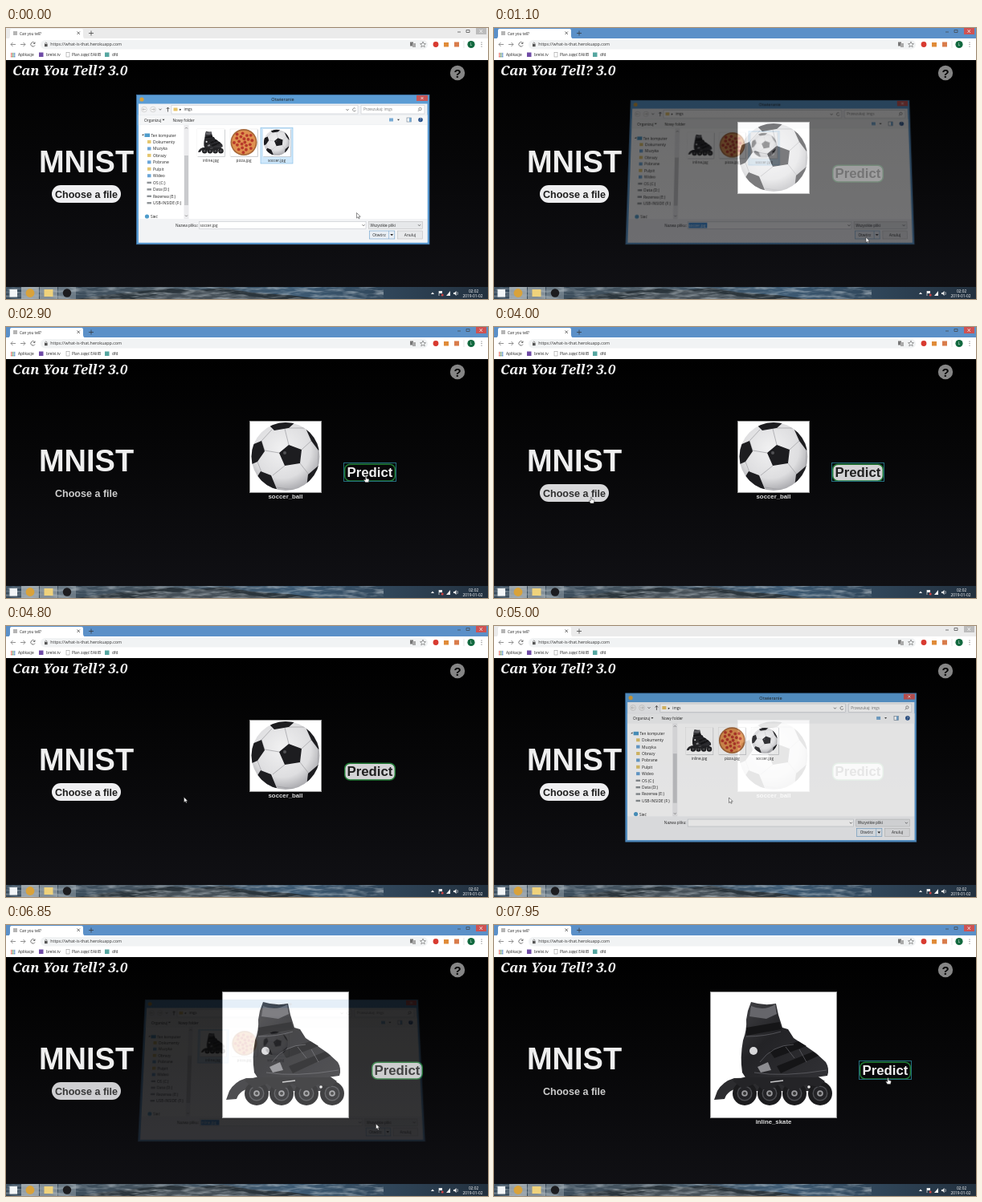
An HTML page for the animation above (8000 ms loop, 600 by 338 pixels).

```html
<!DOCTYPE html>
<html lang="pl">
<head>
<meta charset="utf-8">
<title>Can you tell?</title>
<style>
html, body { margin: 0; width: 100%; height: 100%; overflow: hidden; background: #000; }
svg { position: absolute; left: 0; top: 0; width: 600px; height: 338px; overflow: hidden; }
text { font-family: "Open Sans", "Noto Sans", sans-serif; white-space: pre; }
.bold { font-family: "Liberation Sans", Arial, sans-serif; font-weight: 700; text-anchor: middle; }
.brand { font-family: "Noto Serif", serif; font-weight: 700; font-style: italic; }
#dialog { position: absolute; left: 0; top: 0; width: 600px; height: 338px; }
</style>
</head>
<body>
<svg id="page" viewBox="0 0 600 338"></svg>
<div id="dialog"><svg id="dialogArt" viewBox="0 0 600 338"></svg></div>
<svg id="pointer" viewBox="0 0 600 338">
  <path id="arrow" d="M0 0V6.6L1.6 5.2 2.6 7.4 3.7 6.9 2.7 4.8H4.7Z" fill="#fff" stroke="#222" stroke-width=".5"/>
  <path id="hand" d="M-.7 0Q0-.8.7 0V2.6L3.3 3.2Q4 3.5 3.8 4.6L3.2 7.4H-.8L-2.8 4.5Q-2.4 3.4-.7 4.6Z" fill="#fff" stroke="#222" stroke-width=".5"/>
</svg>
<script>
const LOOP = 8000;
const FIRST_PICK = 1000, REOPEN = 4820, SECOND_PICK = 6620;
const $ = id => document.getElementById(id);
const text = (x, y, size, str, attrs = 'fill="#222"') =>
  `<text x="${x}" y="${y}" font-size="${size}" ${attrs}>${str}</text>`;
const box = (x, y, w, h, fill, attrs = '') =>
  `<rect x="${x}" y="${y}" width="${w}" height="${h}" fill="${fill}" ${attrs}/>`;
const dot = (x, y, r, fill, attrs = '') => `<circle cx="${x}" cy="${y}" r="${r}" fill="${fill}" ${attrs}/>`;
const shape = (d, fill, attrs = '') => `<path d="${d}" fill="${fill}" ${attrs}/>`;
const line = (d, color, width = .7) => shape(d, 'none', `stroke="${color}" stroke-width="${width}"`);

const wheel = x => dot(x, 210, 15, '#1c1c1e') + dot(x, 210, 9.5, '#4b4c50') +
  dot(x, 210, 8, '#232326') + dot(x, 210, 3.8, '#9a9a9d') + dot(x, 210, 2, '#333');

const defs = `<defs>
  <linearGradient id="night" x2="0" y2="1"><stop stop-color="#000"/><stop offset=".4" stop-color="#060607"/><stop offset="1" stop-color="#101014"/></linearGradient>
  <linearGradient id="sea"><stop stop-color="#34485a"/><stop offset=".3" stop-color="#46545f"/><stop offset=".6" stop-color="#3d5a73"/><stop offset="1" stop-color="#22303e"/></linearGradient>
  <filter id="ripples" x="0" y="0" width="1" height="1"><feTurbulence type="fractalNoise" baseFrequency=".05 .3" numOctaves="3" seed="4"/>
    <feColorMatrix values="0 0 0 0 .62 0 0 0 0 .68 0 0 0 0 .72 2.6 0 0 0 -1.1"/></filter>
  <radialGradient id="leather" cx=".45" cy=".4" r=".6"><stop stop-color="#f1f1f2"/><stop offset=".7" stop-color="#dedee0"/><stop offset="1" stop-color="#aeaeb2"/></radialGradient>
  <linearGradient id="boot" x2="1" y2="1"><stop stop-color="#424246"/><stop offset=".4" stop-color="#232326"/><stop offset="1" stop-color="#313135"/></linearGradient>
  <clipPath id="round"><circle cx="348" cy="161.5" r="42.5"/></clipPath>
  <symbol id="ball" viewBox="303 117 90 90">
    ${box(303, 117, 90, 90, '#fff')}${dot(348, 161.5, 42.5, 'url(#leather)')}
    <g clip-path="url(#round)">
      ${line('M340 157L322 154M352 147L347 127M368 153L381 141M366 170L377 184M347 173L332 185M322 154L318 142 331 128M352 126L374 126M389 153L388 174M375 198L358 203 337 200M318 181L313 168', '#9b9b9f')}
      ${shape('M340 157L352 147 368 153 366 170 347 173ZM328 123L343 117 360 119 352 126 334 129ZM318 142L322 155 313 168 304 172 304 148ZM372 124L380 128 392 147 389 154 380 142ZM317 180L330 185 337 202 326 203 312 188ZM376 184L390 172 388 187 374 200Z', '#1d1d20')}
    </g>${dot(347, 157, 2, '#75757a', 'opacity=".6"')}
  </symbol>
  <symbol id="skate" viewBox="269 83 158 158">
    ${box(269, 83, 158, 158, '#fff')}
    ${shape('M274 218L278 207Q285 195 299 191L390 189 408 194 404 207H322L307 203Q291 205 287 217Z', '#2c2c2f')}
    ${[312, 343, 374, 406].map(wheel).join('')}
    ${shape('M297 194L318 188H402L412 195 404 202 388 199 378 205H368L356 198 345 205H334L325 198 309 204Z', '#242427')}
    ${shape('M316 107L320 96Q336 101 351 98L354 112 359 128 366 130 373 141 388 151 401 160 413 171Q418 179 415 188L400 190H313L309 184Q306 165 310 144Q315 130 314 118Z', 'url(#boot)')}
    ${shape('M320 101Q336 108 350 99L352 111 339 117 318 114Z', '#66666b')}
    ${shape('M314 128L355 121 358 130 314 138ZM343 157L379 145 389 151 349 166ZM352 176L397 158 404 163 357 185Z', '#151517')}
    ${line('M314 139Q337 139 357 133M331 171Q346 150 373 149M324 184Q360 190 414 181M363 152L374 166M380 155L389 171', '#68686d')}
    ${shape('M328 177L341 171 345 181 332 184Z', '#8d8d91')}${dot(323, 157, 5, '#d8d8da')}
    ${dot(392, 202, 1.8, '#eee')}${line('M344 196L360 194', '#c8c8ca', 1.5)}
  </symbol>
</defs>`;

const browser = [
  box(0, 0, 600, 14, '#5b90c8', 'id="frameBar"'),
  shape('M3 13.5Q5 13 5 10V3Q5 1 7 1H94Q96 1 96 3V10Q96 13 98 13.5Z', '#fff'),
  box(0, 13, 600, 27, '#fff'), box(9, 4, 5, 5, '#b5b5b5'),
  text(17, 8.5, 4.6, 'Can you tell?'),
  line('M88.5 4.5L92 8M92 4.5L88.5 8M103 6.5H109M106 3.5V9.5', '#333', .7),
  box(585, 0, 13, 8, '#cf5252', 'id="frameClose"'),
  line('M562 5H566M573 2.5H577V5.5H573Z', '#444', .7), line('M589.5 2L593 6M593 2L589.5 6', '#fff', .7),
  line('M12 20.5H6M8.5 18L6 20.5 8.5 23M18 20.5H24M21.5 18L24 20.5 21.5 23', '#777', .8),
  line('M35.5 18.5A2.7 2.7 0 1 0 36 21.5M36 17.5V19.5H34', '#555', .8),
  box(43, 15, 482, 11.5, '#f1f3f4', 'rx="5.7"'),
  box(48, 20, 3.6, 3.2, '#555'), line('M48.7 20V18.8Q49.8 17 50.9 18.8V20', '#555', .6),
  text(55.3, 22.4, 5.35, 'https://what-is-that.herokuapp.com', 'fill="#333"'),
  box(503, 17.5, 4, 5, '#777'), box(506, 19, 4, 5, '#aaa'),
  shape('M519 17L520 19.5 522.5 19.7 520.6 21.3 521.2 23.8 519 22.4 516.8 23.8 517.4 21.3 515.5 19.7 518 19.5Z', 'none', 'stroke="#666" stroke-width=".6"'),
  dot(535, 20.5, 3.4, '#d83a30'), box(545, 18, 6, 5.5, '#e08b38'), box(558, 17.5, 6, 6, '#d97c4b'),
  line('M570 16V25', '#ccc', .5), dot(579, 20.5, 4.6, '#12693f'),
  text(579, 22.3, 4.6, 'L', 'fill="#fff" text-anchor="middle"'),
  [18, 20.5, 23].map(y => dot(592, y, .6, '#555')).join(''),
  [0, 1, 2, 3, 4, 5, 6, 7, 8].map(i => box(6 + i % 3 * 2, 31 + (i / 3 | 0) * 2, 1.4, 1.4, ['#d65243', '#4a8c58', '#4d82c8'][i % 3])).join(''),
  text(15, 35, 4.8, 'Aplikacje'), box(41, 30.5, 5.5, 5.5, '#6f4ba6'),
  text(50, 35, 4.8, 'brelvi.tv'), box(75, 30.5, 4, 5.5, '#fff', 'stroke="#888" stroke-width=".5"'),
  text(82, 35, 4.8, 'Plan zajęć EAIiIB'), box(123, 30.5, 5.5, 5.5, '#55a6a0'), text(132, 35, 4.8, 'dfd'),
].join('');

const dotted = 'stroke="#333" stroke-dasharray="1 1"';
const site = [
  box(0, 40, 600, 283, 'url(#night)'),
  text(8, 59, 16.8, 'Can You Tell? 3.0', 'class="brand" fill="#f4f4f4"'),
  dot(562, 56, 9.2, '#858585'),
  text(562, 61.5, 15, '?', 'class="bold" fill="#050505"'),
  text(100, 180, 38, 'MNIST', 'class="bold" fill="#efefef"'),
  box(57, 196, 86, 22, '#efeff1', 'rx="11" id="chooseBg"'),
  text(100, 211.6, 12.55, 'Choose a file', 'class="bold" id="chooseText"'),
  `<g id="ballView"><use href="#ball" x="303" y="117" width="90" height="90"/>${box(303.5, 117.5, 89, 89, 'none', dotted)}</g>`,
  `<g id="skateView"><use href="#skate" x="269" y="83" width="158" height="158"/>${box(269.5, 83.5, 157, 157, 'none', dotted)}</g>`,
  text(348, 213.6, 7.8, '', 'class="bold" id="caption" fill="#ddd"'),
  `<g id="predict">
    ${box(421.7, 171.2, 62.6, 20.8, '#d3d3d5', 'rx="6.5" id="predictBg"')}
    ${box(421.7, 171.2, 62.6, 20.8, 'none', 'rx="6.5" stroke="#1f7a33" stroke-width="1.5"')}
    ${box(420.5, 169.5, 65, 23, 'none', 'id="focusRing" stroke="#246f80" stroke-width="1"')}
    ${text(453, 187.2, 16.8, 'Predict', 'class="bold" id="predictText"')}</g>`,
].join('');

const taskbar = [
  box(0, 323, 600, 15, 'url(#sea)'),
  shape('M88 338L124 333 170 328 205 325 238 327 270 324 306 330 352 333 390 338Z', '#2b353c'),
  shape('M160 338L196 331 228 330 262 327 292 333 330 338Z', '#465058'),
  box(0, 323, 470, 15, '#fff', 'filter="url(#ripples)" opacity=".5"'),
  box(19, 323, 22, 15, '#b4bdc0', 'opacity=".75"'), box(42, 323, 22, 15, '#b4bdc0', 'opacity=".6"'),
  box(65, 323, 22, 15, '#a4b0b6', 'opacity=".45"'),
  box(4.5, 326, 9.5, 9.5, '#f2f5f7'), dot(30, 330.5, 5.4, '#d9a23a'),
  box(47.5, 326, 11, 9, '#efd27c'), dot(76, 330.5, 5.2, '#1c1c1f'),
  shape('M529 332L531 329.5 533 332Z', '#fff'), box(539, 328, 4, 3, '#eee'), line('M539 328V334', '#eee'),
  dot(543.2, 333, 1.5, '#d04444'), shape('M548 334L553 328V334Z', '#eee'),
  shape('M557 330H558.5L560.5 328V334L558.5 332H557Z', '#eee'), line('M561.8 329Q563 331 561.8 333', '#eee', .6),
  text(582, 329.6, 4.8, '02:02', 'fill="#fff" text-anchor="middle"'),
  text(581, 336, 4.8, '2019-01-02', 'fill="#fff" text-anchor="middle"'),
].join('');

$('page').innerHTML = defs + site + browser + taskbar;

const toppings = Array.from({ length: 21 }, (_, i) => {
  const r = 2.9 * Math.sqrt(i + .2), a = i * 2.4;
  return dot(296 + r * Math.cos(a), 142.5 + r * Math.sin(a), 1.9, '#b8392a');
}).join('');

const places = ['Dokumenty', 'Muzyka', 'Obrazy', 'Pobrane', 'Pulpit', 'Wideo', 'OS (C:)', 'Data (D:)', 'Rezerwa (E:)', 'USB-INSIDE (F:)'];
const placeRows = places.map((name, i) => {
  const y = 144 + i * 8.45;
  const icon = i < 6 ? box(176, y - 4, 4.5, 4, ['#e5c76f', '#6aa5d8'][i % 2]) : box(175.5, y - 3, 5.5, 2.4, '#8d9296');
  return icon + text(183, y, 5, name);
}).join('');
const field = (x, y, w, h) => box(x, y, w, h, '#fff', 'stroke="#c3c7cc" stroke-width=".6"');
const chevron = (x, y) => line(`M${x - 1.5} ${y - .8}L${x} ${y + .8} ${x + 1.5} ${y - .8}`, '#444', .7);
const middle = 'fill="#222" text-anchor="middle"';

$('dialogArt').innerHTML = [
  box(162.5, 83.3, 364.5, 186.5, '#5b9cd4', 'stroke="#3f76a8" stroke-width=".7"'),
  box(511, 84, 14, 7, '#c95656'), line('M516.5 86L519.5 89M519.5 86L516.5 89', '#fff', .7),
  dot(169, 89, 2.6, '#d9a23a'), text(344.5, 91.2, 5.6, 'Otwieranie', middle),
  box(165, 94.5, 359.5, 173, '#f2f3f5'),
  dot(172, 101.5, 3.4, '#f4f4f4', 'stroke="#bbb" stroke-width=".5"'), dot(183, 101.5, 3.4, '#f4f4f4', 'stroke="#bbb" stroke-width=".5"'),
  line('M174 101.5H170M171.5 100L170 101.5 171.5 103M181 101.5H185M183.5 100L185 101.5 183.5 103', '#aaa', .6),
  line('M201.5 104.5V99M199.7 101L201.5 99 203.3 101', '#444', .8), chevron(192, 101.5),
  field(206, 96.5, 232, 10.5), box(208.5, 99.5, 5, 4, '#e8c468'),
  text(216, 103.3, 4.6, '▸'), text(221.5, 103.4, 4.7, 'imgs'), chevron(425, 102),
  line('M435 100.4A2 2 0 1 0 435.5 102.5', '#666', .7),
  field(442, 96.5, 79, 10.5), text(445, 103.4, 4.7, 'Przeszukaj: imgs', 'fill="#777"'),
  dot(515.5, 101, 1.7, 'none', 'stroke="#666" stroke-width=".7"'), line('M514.3 102.3L512.8 104', '#666'),
  box(165, 108.5, 359.5, 12.5, '#f5f6f7', 'stroke="#dde1e5" stroke-width=".4"'),
  text(172, 116.6, 4.8, 'Organizuj'), shape('M194.5 113.7H197.5L196 115.4Z', '#333'),
  text(207.5, 116.6, 4.8, 'Nowy folder'),
  box(477, 112.5, 5, 4, '#77aad4'), shape('M487 113.7H490L488.5 115.4Z', '#333'),
  box(499, 112, 5.5, 5, '#fff', 'stroke="#678" stroke-width=".6"'), box(502, 112, 2.5, 5, '#77aad4'),
  dot(516, 114.5, 2.8, '#28528c'), text(516, 116.2, 4.4, '?', 'fill="#fff" text-anchor="middle"'),
  box(165, 121, 359.5, 117, '#fff'),
  shape('M169 134L171.3 132V134Z', '#333'), box(172.5, 131.5, 6.5, 4.5, '#4e9ccb'), text(180.5, 135.8, 4.8, 'Ten komputer'), placeRows,
  dot(175.5, 235, 2.6, '#4e9ccb'), text(180, 237, 4.8, 'Sieć'),
  box(221.5, 121, 6, 117, '#ececee'), box(222, 159, 5, 62, '#c9cacd'),
  line('M223 125.5L224.5 124 226 125.5M223 233.5L224.5 235 226 233.5', '#555', .6),
  box(317, 124.5, 40, 44.5, '#cfe8fb', 'id="soccerPick" stroke="#7db9e3" stroke-width=".6"'),
  box(235, 124.5, 40, 44.5, '#cfe8fb', 'id="inlinePick" stroke="#7db9e3" stroke-width=".6"'),
  [238, 279, 320].map(x => box(x + .7, 126.7, 34, 34, '#b9bcc0') + box(x, 126, 34, 34, '#fff', 'stroke="#ddd" stroke-width=".4"')).join(''),
  '<use href="#skate" x="238" y="126" width="34" height="34"/><use href="#ball" x="320" y="126" width="34" height="34"/>',
  dot(296, 142.5, 16.5, '#a8693a'), dot(296, 142.5, 14.8, '#df9150'), toppings,
  text(255, 167, 4.7, 'inline.jpg', middle), text(296, 167, 4.7, 'pizza.jpg', middle), text(337, 167, 4.7, 'soccer.jpg', middle),
  box(165, 238, 359.5, 29.5, '#f2f3f5'),
  text(211, 247.8, 4.75, 'Nazwa pliku:'), field(240.5, 241.5, 207.5, 9),
  box(241.5, 242.7, 23.5, 6.7, '#2f87d8', 'id="nameMark"'), text(241.5, 247.7, 4.7, '', 'id="fileName"'), chevron(445, 246),
  box(451.5, 241.5, 67, 9, '#e6e8ea', 'stroke="#b5b5b5" stroke-width=".5"'), text(453.5, 247.7, 4.7, 'Wszystkie pliki'), chevron(514.5, 246),
  box(452.3, 253, 31.5, 10, '#e9eef4', 'stroke="#6b9fcb" stroke-width=".6"'), line('M476.5 253V263', '#6b9fcb', .5),
  text(464.5, 259.8, 4.8, 'Otwórz', middle), shape('M478.3 257H482L480.2 259.2Z', '#222'),
  box(487.3, 253, 31, 10, '#e8e9eb', 'stroke="#b5b5b5" stroke-width=".5"'), text(503, 259.8, 4.8, 'Anuluj', middle),
].join('');

// Tables of [time, ...values], interpolated between rows.
const pointerPath = [[0, 436.5, 230.5], [150, 436.5, 230.5], [700, 463, 261], [1200, 463, 261], [1850, 448, 198.5], [2050, 452, 186],
  [2850, 452, 186], [3650, 121, 212.5], [4550, 121, 212.5], [5000, 292.5, 214], [5100, 292.5, 214], [5500, 254, 146],
  [5850, 254, 146], [6400, 460.5, 248], [6900, 460.5, 248], [7350, 490.5, 191]];
const chooseFill = [[0, 1], [1100, 1], [1600, 0], [3550, 0], [4050, 1], [6780, 1], [7280, 0]];
const predictFill = [[0, 1], [1980, 1], [2380, 0], [2950, 0], [3450, 1], [7250, 1], [7650, 0]];
const closing = [[0, 0], [955, 0], [1205, 1], [REOPEN, 1], [REOPEN, 0], [6640, 0], [6892, 1]];

const clamp = v => Math.max(0, Math.min(1, v));
const smooth = u => u * u * (3 - 2 * u);
function sample(rows, t, ease = u => u) {
  const i = rows.findIndex(row => row[0] > t);
  if (i < 0) return rows.at(-1).slice(1);
  const a = rows[i - 1], b = rows[i], u = ease((t - a[0]) / (b[0] - a[0]));
  return a.slice(1).map((v, k) => v + (b[k + 1] - v) * u);
}
const within = (t, from, to) => t >= from && t < to;
const show = (id, on) => { $(id).style.display = on ? '' : 'none'; };
const set = (id, name, value) => $(id).setAttribute(name, value);
const gray = v => `rgb(${v},${v},${v})`;

function drawDialog(t) {
  const [shut] = sample(closing, t);
  const open = t < REOPEN ? 1 : clamp((t - REOPEN) / 203);
  const style = $('dialog').style;
  style.opacity = (1 - shut) * open;
  // Closing tips the window back on its lower edge; opening only grows it.
  style.transformOrigin = shut ? '344px 269px' : '344px 176px';
  style.transform = shut
    ? `translateX(${-2 * shut}px) perspective(350px) scaleX(${1 - shut * .025}) rotateX(${shut * 6.7}deg)`
    : open < 1 ? `scale(${.94 + .06 * open})` : 'none';
  const marked = within(t, 900, REOPEN) || t >= 6550;
  show('soccerPick', t < REOPEN);
  show('inlinePick', t >= 5600);
  show('nameMark', marked);
  $('fileName').textContent = t < REOPEN ? 'soccer.jpg' : t < 5600 ? '' : 'inline.jpg';
  set('fileName', 'fill', marked ? '#fff' : '#222');
  const browserActive = shut > 0;
  set('frameBar', 'fill', browserActive ? '#5b90c8' : '#ebebeb');
  set('frameClose', 'fill', browserActive ? '#cf5252' : '#bcbcbc');
}

function drawSite(t) {
  const second = t >= SECOND_PICK;
  show('ballView', within(t, FIRST_PICK, SECOND_PICK));
  show('skateView', second);
  $('caption').textContent = second ? (t >= 7850 ? 'inline_skate' : '') : (t >= 2600 ? 'soccer_ball' : '');
  set('caption', 'y', second ? 248 : 213.6);
  const [choose] = sample(chooseFill, t), [fill] = sample(predictFill, t);
  set('chooseBg', 'opacity', choose);
  set('chooseText', 'fill', gray(205 - 175 * choose));
  set('predict', 'opacity', clamp((t - (second ? SECOND_PICK : FIRST_PICK)) / 250));
  set('predict', 'transform', `translate(${second ? 34 : 0} 0)`);
  set('predictBg', 'opacity', fill);
  set('predictText', 'fill', gray(240 - 208 * fill));
  show('focusRing', within(t, 2200, 4400) || t >= 7500);
}

function drawPointer(t) {
  const [x, y] = sample(pointerPath, t, smooth);
  const hand = within(t, 2000, 2920) || within(t, 3560, 4620) || t >= 7310;
  show('hand', hand);
  show('arrow', !hand);
  set(hand ? 'hand' : 'arrow', 'transform', `translate(${x} ${y})`);
}

const start = performance.now();
function frame() {
  const t = (performance.now() - start) % LOOP;
  drawSite(t);
  drawDialog(t);
  drawPointer(t);
  requestAnimationFrame(frame);
}
frame();
</script>
</body>
</html>
```
